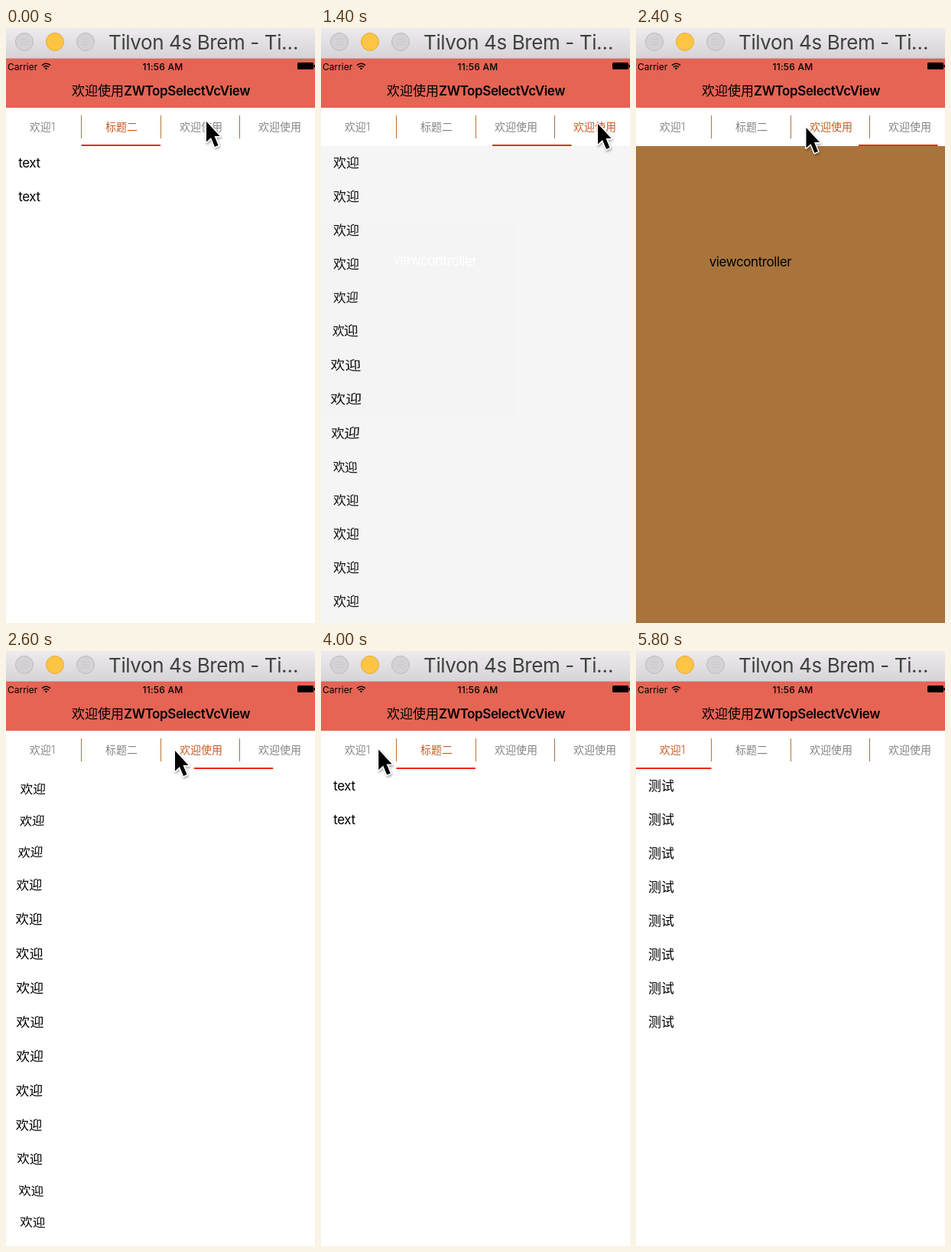
An HTML page for the animation above (6 s loop, 404 by 776 pixels).

```html
<!DOCTYPE html>
<html lang="zh">
<head>
<meta charset="utf-8">
<title>Tab switcher</title>
<style>
  html, body { margin: 0; width: 100%; height: 100%; overflow: hidden; background: #fff; }
  svg { display: block; width: 404px; height: 776px; }
  text { font-family: Inter, "Noto Sans CJK SC", "Noto Sans CJK", sans-serif; }
  .mid { text-anchor: middle; }
  .tab { font-size: 14px; font-weight: 300; fill: #858585; }
  .tab.on { fill: #ca5c24; }
  .row { font-size: 17px; text-anchor: middle; }
  .latin { letter-spacing: -.4px; }
  .status { font-size: 12px; }
</style>
</head>
<body>
<svg viewBox="0 0 404 776">
  <defs>
    <linearGradient id="chrome" x2="0" y2="1">
      <stop stop-color="#edebed"/>
      <stop offset="1" stop-color="#d5d3d5"/>
    </linearGradient>
    <filter id="shade" x="-50%" y="-50%" width="200%" height="200%">
      <feDropShadow dx="1" dy="2" stdDeviation="1.5" flood-opacity=".35"/>
    </filter>
  </defs>

  <g id="pages"></g>

  <!-- window title bar -->
  <rect width="404" height="40" fill="url(#chrome)"/>
  <rect y="39" width="404" height="1" fill="#bebbbe"/>
  <g stroke="#bdbabd" fill="#d5d2d5">
    <circle cx="24" cy="18" r="11.5"/>
    <circle cx="64" cy="18" r="11.5" fill="#fec443" stroke="#e3ab40"/>
    <circle cx="104" cy="18" r="11.5"/>
    <path d="M19 14.5h10M19 18h10M19 21.5h10M99 14.5h10M99 18h10M99 21.5h10" stroke="#cbc8cb"/>
  </g>
  <text class="latin" x="134" y="28" font-size="26" fill="#414041">Tilvon 4s Brem - Ti…</text>

  <!-- status and navigation bar -->
  <rect y="40" width="404" height="64" fill="#e56454"/>
  <text class="status" x="2" y="55">Carrier</text>
  <g fill="none" stroke="#000" stroke-width="1.5">
    <path d="M47 48.6q5.5-4.6 11 0M49 51q3.5-2.8 7 0"/>
    <path d="M52.5 54.5l-1.8-2q1.8-1.4 3.6 0z" fill="#000" stroke="none"/>
  </g>
  <text class="status mid" x="205" y="55" font-weight="500" letter-spacing=".25">11:56 AM</text>
  <rect x="381" y="45" width="21" height="9" rx="1.5"/>
  <rect x="402.5" y="48" width="1.5" height="3.5"/>
  <text x="86" y="88" font-size="17" font-weight="500">欢迎使用</text>
  <text class="latin" x="154" y="88" font-size="17" font-weight="600">ZWTopSelectVcView</text>

  <!-- tab bar -->
  <rect y="104" width="404" height="50" fill="#fff"/>
  <g id="tabs">
    <text class="tab mid" x="47.5" y="134">欢迎1</text>
    <text class="tab mid" x="151" y="134">标题二</text>
    <text class="tab mid" x="255" y="134">欢迎使用</text>
    <text class="tab mid" x="358" y="134">欢迎使用</text>
  </g>
  <path d="M98.5 114v30M202.5 114v30" stroke="#b87434"/>
  <path d="M305.5 114v30" stroke="#98734f"/>
  <rect id="line" y="152" width="103.5" height="2" fill="#ee2a12"/>

  <path id="cursor" d="M0 0V26.5L6 21 11 33 15.5 31 10.5 19H17.5Z" stroke="#fff" stroke-width="3"
        paint-order="stroke" stroke-linejoin="round" filter="url(#shade)"/>
</svg>
<script>
  const LOOP = 6000, STEP = 200, SLIDE = 655, PITCH = 103.5;
  const CENTER = { x: 202, y: 475 };
  // [time, tab] of every tap
  const TAPS = [[-9999, 1], [200, 2], [1200, 3], [2240, 2], [3250, 1], [4296, 0]];
  // [time, x, y] of the pointer tip
  const POINTER = [
    [0, 262, 122], [400, 262, 124], [1200, 362, 125], [1400, 362, 125],
    [1600, 342, 127], [2200, 224, 130], [2600, 221, 130], [3200, 153, 127],
    [3400, 151, 127], [4200, 50, 129], [4600, 47, 129], [5200, -30, 135], [LOOP, -30, 135]
  ];

  const byId = id => document.getElementById(id);
  const clamp = v => Math.max(0, Math.min(1, v));
  const mix = (a, b, p) => a + (b - a) * p;
  const tabs = [...byId('tabs').children];

  function add(parent, tag, attrs, text = '') {
    const el = document.createElementNS('http://www.w3.org/2000/svg', tag);
    for (const key in attrs) el.setAttribute(key, attrs[key]);
    el.textContent = text;
    return parent.appendChild(el);
  }

  function makePage(fill) {
    const group = add(byId('pages'), 'g', {});
    const back = add(group, 'rect', { y: 154, width: 404, height: 622, fill });
    return { group, back, fill, bits: [] };
  }

  function addBit(page, text, x, y, cls = '') {
    const el = add(page.group, 'text', { class: 'row ' + cls, y: 6 }, text);
    page.bits.push({ el, x, y });
  }

  function listPage(word, count) {
    const page = makePage('#fff');
    for (let i = 0; i < count; i++) {
      const y = 176 + 44 * i;
      if (word === 'text') addBit(page, word, 30.5, y, 'latin');
      else [...word].forEach((c, k) => addBit(page, c, 24.5 + 17 * k, y));
    }
    return page;
  }

  const pages = [listPage('测试', 8), listPage('text', 2), listPage('欢迎', 14), makePage('#a9743b')];
  addBit(pages[3], 'viewcontroller', 149.5, 305, 'latin');

  // Radial shift of a point in a ring that spreads from the centre and dies away
  function ripple(x, y, t) {
    const dx = x - CENTER.x, dy = y - CENTER.y, r = Math.hypot(dx, dy) || 1;
    const u = r - (192 + 1.7 * (t - 304));
    const fall = u < 0 ? u / 140 : u > 150 ? (u - 150) / 25 : 0;
    const size = 12 * Math.exp(-(t - 200) / 190 - fall * fall);
    const d = -size * Math.sin(2 * Math.PI * u / 300) / r;
    return [dx * d, dy * d];
  }

  // Places each piece of text and leans it along the local slope of the ripple
  function warp(page, t) {
    const e = 8;
    for (const { el, x, y } of page.bits) {
      const [px, py] = ripple(x, y, t);
      const [ax, ay] = ripple(x + e, y, t);
      const [bx, by] = ripple(x, y + e, t);
      const m = [1 + (ax - px) / e, (ay - py) / e, (bx - px) / e, 1 + (by - py) / e, x + px, y + py];
      el.setAttribute('transform', `matrix(${m.map(v => v.toFixed(4))})`);
    }
  }

  function drawPages(from, to, t) {
    const fade = clamp((t - 190) / 100);
    pages.forEach((page, i) => {
      const shown = i === to ? fade > 0 : i === from && fade < 1;
      page.group.style.display = shown ? '' : 'none';
      if (!shown) return;
      page.group.style.opacity = i === to ? fade : 1;
      warp(page, t);
    });
    // The coloured page first shows as a pale grey veil with light lettering
    const veil = to === 3 && fade < .5;
    pages[3].back.setAttribute('fill', veil ? '#999' : pages[3].fill);
    pages[3].bits[0].el.setAttribute('fill', veil ? '#fff' : '#000');
    byId('pages').appendChild(pages[to].group);
  }

  function drawPointer(t) {
    const i = POINTER.findIndex(p => p[0] > t);
    const [t0, x0, y0] = POINTER[i - 1], [t1, x1, y1] = POINTER[i];
    const p = (t - t0) / (t1 - t0);
    byId('cursor').setAttribute('transform', `translate(${mix(x0, x1, p)} ${mix(y0, y1, p)})`);
  }

  function draw(t) {
    const n = TAPS.filter(tap => tap[0] <= t).length - 1;
    const [start, to] = TAPS[n];
    const from = n ? TAPS[n - 1][1] : to;
    const age = t - start;
    const p = (1 - Math.cos(Math.PI * clamp(age / SLIDE))) / 2;
    byId('line').setAttribute('x', mix(from, to, p) * PITCH - 5);
    tabs.forEach((tab, i) => tab.classList.toggle('on', i === to));
    drawPages(from, to, age);
    drawPointer(t);
  }

  const begin = performance.now();
  function tick() {
    const t = (performance.now() - begin) % LOOP;
    draw(Math.floor(t / STEP) * STEP);
    requestAnimationFrame(tick);
  }
  tick();
</script>
</body>
</html>
```
